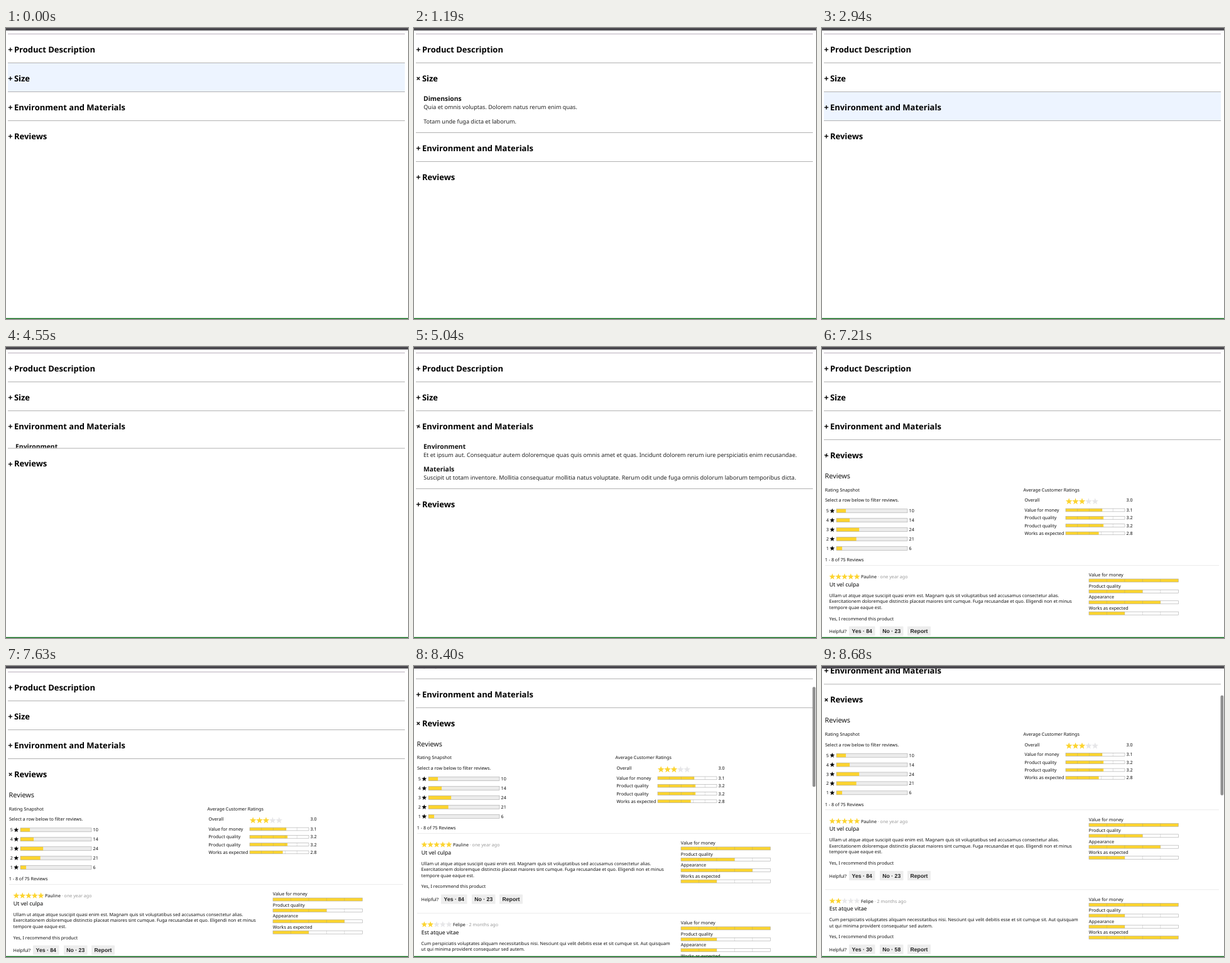
An HTML page that plays this animation: 640 by 463 pixels, repeating every 8.75 s.

```html
<!DOCTYPE html>
<html lang="en">
<head>
<meta charset="utf-8">
<title>Product accordion</title>
<style>
  html, body { margin: 0; width: 100%; height: 100%; overflow: hidden; background: #fff; }
  svg { display: block; }
  text { font-family: "Noto Sans", "Open Sans", sans-serif; text-rendering: geometricPrecision; white-space: pre; }
  .title { font-size: 13px; font-weight: 700; }
  .subtitle { font-size: 10.4px; font-weight: 700; fill: #111; }
  .copy { font-size: 9.09px; fill: #222; }
  .heading { font-size: 10.8px; fill: #111; }
  .name { font-size: 8.7px; fill: #000; }
  .small { font-size: 7.17px; fill: #111; }
  .date { fill: #999; }
  .button { font: 700 8.7px "Liberation Sans", Arial, sans-serif; fill: #222; }
</style>
</head>
<body>
<svg id="stage" width="100%" height="100%" viewBox="0 0 640 463"></svg>
<script>
const LOOP = 8750, ROW = 46, TOP = 9;
const PANEL_TIME = 500, ICON_TIME = 850;
const SCROLL_START = 7910;
const YELLOW = '#fcd42f';
const stage = document.getElementById('stage');

function add(parent, tag, attrs = {}, content) {
  const el = document.createElementNS('http://www.w3.org/2000/svg', tag);
  for (const key in attrs) el.setAttribute(key, attrs[key]);
  if (content !== undefined) el.textContent = content;
  parent.appendChild(el);
  return el;
}
const rect = (parent, x, y, width, height, fill, extra) =>
  add(parent, 'rect', { x, y, width, height, fill, ...extra });
const label = (parent, cls, x, y, content) => add(parent, 'text', { class: cls, x, y }, content);

function star(parent, cx, cy, r, fill) {
  const points = Array.from({ length: 10 }, (_, i) => {
    const a = (i / 5 - 0.5) * Math.PI, d = i % 2 ? r * 0.42 : r;
    return (cx + d * Math.cos(a)).toFixed(2) + ',' + (cy + d * Math.sin(a)).toFixed(2);
  });
  add(parent, 'polygon', { points: points.join(' '), fill });
}
function stars(parent, x, cy, step, count) {
  for (let i = 0; i < 5; i++)
    star(parent, x + step * (i + 0.5), cy, step * 0.53, i < count ? YELLOW : '#e6e6e8');
}
function bar(parent, x, y, w, h, part, back, segments = 1) {
  rect(parent, x, y, w, h, back);
  rect(parent, x, y, w * part, h, YELLOW);
  for (let i = 1; i < segments; i++)
    rect(parent, x + w * i / segments - 0.3, y, 0.6, h, '#8a8a8a', { opacity: 0.45 });
  rect(parent, x, y, w, h, 'none', { stroke: '#a8a8a8', 'stroke-width': 0.6 });
}

function sizePanel(p) {
  label(p, 'subtitle', 15, 15, 'Dimensions');
  label(p, 'copy', 15.2, 28, 'Quia et omnis voluptas. Dolorem natus rerum enim quas.');
  label(p, 'copy', 15.2, 50.5, 'Totam unde fuga dicta et laborum.');
}
function materialsPanel(p) {
  label(p, 'subtitle', 15, 15, 'Environment');
  label(p, 'copy', 15, 28, 'Et et ipsum aut. Consequatur autem doloremque quas quis omnis amet et quas. Incidunt dolorem rerum iure perspiciatis enim recusandae.');
  label(p, 'subtitle', 15, 50.7, 'Materials');
  label(p, 'copy', 15.2, 63.8, 'Suscipit ut totam inventore. Mollitia consequatur mollitia natus voluptate. Rerum odit unde fuga omnis dolorum laborum temporibus dicta.');
}

function button(p, x, y, w, content) {
  rect(p, x, y, w, 15, '#ededed', { rx: 0.8 });
  add(p, 'text', { class: 'button', x: x + w / 2, y: y + 10.8, 'text-anchor': 'middle' }, content);
}
function review(p, y, r) {
  rect(p, 5, y, 627, 0.8, '#e6e6e6');
  stars(p, 11.5, y + 18.5, 9.8, r.stars);
  const by = label(p, 'small', 62, y + 21.4, r.name);
  add(by, 'tspan', { class: 'date' }, ' · ' + r.date);
  label(p, 'name', 11.7, y + 33.7, r.title);
  r.lines.forEach((line, i) => label(p, 'small', 11.6, y + 50.7 + 9.7 * i, line));
  const end = y + 48 + 9.7 * r.lines.length;
  label(p, 'small', 11.6, end + 10.4, 'Yes, I recommend this product');
  label(p, 'small', 11.6, end + 31.2, 'Helpful?');
  button(p, 43, end + 20.5, 41.5, 'Yes · ' + r.yes);
  button(p, 92, end + 20.5, 37.5, 'No · ' + r.no);
  button(p, 136, end + 20.5, 37, 'Report');
  ['Value for money', 'Product quality', 'Appearance', 'Works as expected'].forEach((name, i) => {
    label(p, 'small', 424.8, y + 18.4 + 17.45 * i, name);
    bar(p, 425, y + 22 + 17.4 * i, 142.3, 5, r.scores[i] / 5, '#fff', 5);
  });
}
function reviewsPanel(panel) {
  // Positions below are page positions with the other panels closed.
  const p = add(panel, 'g', { transform: 'translate(0 -193)' });
  label(p, 'heading', 4.6, 209, 'Reviews');
  label(p, 'small', 4.8, 229.6, 'Rating Snapshot');
  label(p, 'small', 4.9, 246.4, 'Select a row below to filter reviews.');
  [10, 14, 24, 21, 6].forEach((count, i) => {
    const y = 260.8 + 14.9 * i;
    label(p, 'small', 6.8, y + 2.6, 5 - i);
    star(p, 16.3, y + 0.1, 4.2, '#000');
    bar(p, 23, y - 3, 113, 6, count / 75, '#ececec');
    label(p, 'small', 138.6, y + 2.6, count);
  });
  label(p, 'small', 4.8, 341.2, '1 - 8 of 75 Reviews');

  label(p, 'small', 320.5, 229.6, 'Average Customer Ratings');
  label(p, 'small', 322.5, 246.4, 'Overall');
  stars(p, 388, 245.8, 10.4, 3);
  label(p, 'small', 484.4, 246.4, '3.0');
  [['Value for money', 3.1], ['Product quality', 3.2], ['Product quality', 3.2], ['Works as expected', 2.8]]
    .forEach(([name, score], i) => {
      const y = 259.5 + 12.3 * i;
      label(p, 'small', 322.5, y + 2.6, name);
      bar(p, 388, y - 2.4, 94, 4.8, score / 5, '#fff', 5);
      label(p, 'small', 484.4, y + 2.6, score.toFixed(1));
    });

  review(p, 347, {
    name: 'Pauline', date: 'one year ago', stars: 5, title: 'Ut vel culpa', yes: 84, no: 23, scores: [5, 3, 4, 2],
    lines: ['Ullam ut atque atque suscipit quasi enim est. Magnam quis sit voluptatibus sed accusamus consectetur alias.',
      'Exercitationem doloremque distinctio placeat maiores sint cumque. Fuga recusandae et quo. Eligendi non et minus',
      'tempore quae eaque est.']
  });
  review(p, 474, {
    name: 'Felipe', date: '2 months ago', stars: 2, title: 'Est atque vitae', yes: 30, no: 58, scores: [5, 2, 2, 5],
    lines: ['Cum perspiciatis voluptates aliquam necessitatibus nisi. Nesciunt qui velit debitis esse et sit cumque sit. Aut quisquam',
      'ut qui minima provident consequatur sed autem.']
  });
}

// open/close are click times; hover lists the spans in which a closed row is highlighted.
const rows = [
  { title: 'Product Description', height: 0, hover: [] },
  { title: 'Size', height: 65, fill: sizePanel, open: 400, close: 1860, hover: [[0, 400], [1860, 2870]] },
  { title: 'Environment and Materials', height: 78, fill: materialsPanel, open: 4520, close: 5570, hover: [[2870, 4520], [5570, 6440]] },
  { title: 'Reviews', height: 1090, fill: reviewsPanel, open: 6900, close: Infinity, hover: [[6440, 6900]] }
];

const page = add(stage, 'g');
rows.forEach((row, i) => {
  row.group = add(page, 'g');
  row.back = rect(row.group, 3, 1, 632, 45, '#edf4ff');
  rect(row.group, 3, 0, 632, 1, i ? '#b2b2b2' : '#b9aebb');
  row.icon = add(row.group, 'g');
  add(row.icon, 'text', { class: 'title', x: 0, y: 4.6, 'text-anchor': 'middle' }, '+');
  label(row.group, 'title', 12.9, 29.8, row.title);
  row.panel = add(row.group, 'svg', { x: 0, y: ROW, width: 640, height: 0, overflow: 'hidden' });
  if (row.fill) row.fill(row.panel);
});
const thumb = rect(stage, 634.5, 0, 4.6, 159, '#8f8f8f', { rx: 2 });
rect(stage, 0, 0, 640, 4, '#4c4a50');
rect(stage, 0, 461.6, 640, 1.4, '#0b6a17');

const clamp = v => Math.min(1, Math.max(0, v));
const easeOut = v => 1 - (1 - v) ** 3;
const easeInOut = v => v * v * (3 - 2 * v);
const openness = (row, t, time, ease) => row.open === undefined ? 0 :
  ease(clamp((t - row.open) / time)) - ease(clamp((t - row.close) / time));

function draw(t) {
  let y = TOP;
  for (const row of rows) {
    const height = row.height * openness(row, t, PANEL_TIME, easeOut);
    const angle = 45 * openness(row, t, ICON_TIME, easeInOut);
    row.group.setAttribute('transform', `translate(0 ${y})`);
    row.icon.setAttribute('transform', `translate(7 25.4) rotate(${angle})`);
    row.panel.setAttribute('height', height);
    row.panel.setAttribute('visibility', height > 0 ? 'visible' : 'hidden');
    row.back.setAttribute('visibility', row.hover.some(([a, b]) => t >= a && t < b) ? 'visible' : 'hidden');
    y += ROW + height;
  }
  const s = Math.max(0, t - SCROLL_START);
  const scroll = 0.1852 * s - 4.07e-5 * s * s;
  page.setAttribute('transform', `translate(0 ${-scroll})`);
  thumb.setAttribute('y', 4 + 0.36 * scroll);
  thumb.setAttribute('visibility', s > 0 ? 'visible' : 'hidden');
}

const start = performance.now();
function tick() {
  draw((performance.now() - start) % LOOP);
  requestAnimationFrame(tick);
}
tick();
</script>
</body>
</html>
```
